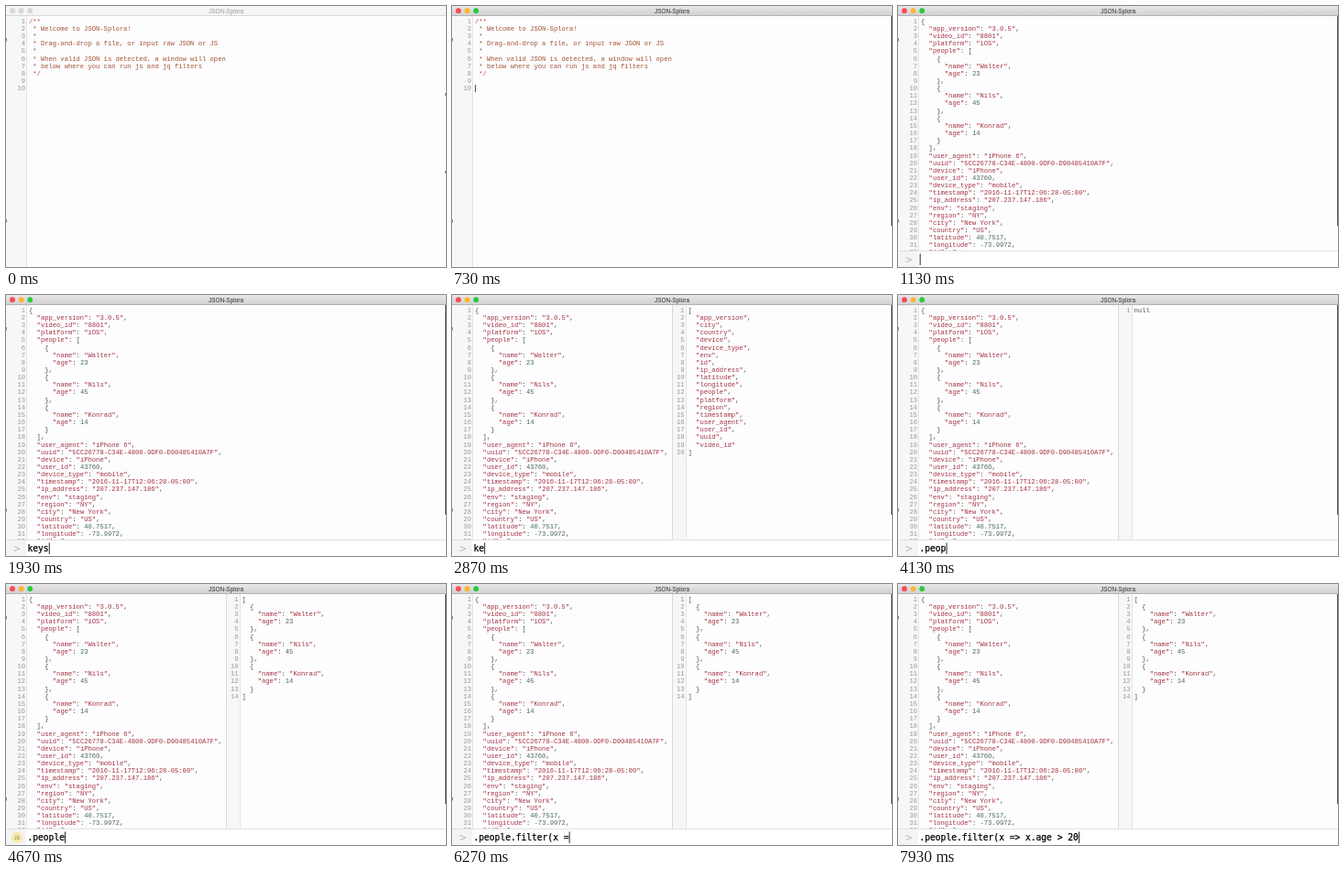
An HTML page with a canvas for the animation above (8000 ms loop, 480 px wide and 285 px high).

```html
<!DOCTYPE html>
<html lang="en">
<head>
<meta charset="utf-8">
<title>JSON-Splora</title>
<style>
html, body { margin: 0; width: 100%; height: 100%; overflow: hidden; background: #fdfcfe; }
canvas { display: block; width: 480px; height: 285px; }
</style>
</head>
<body>
<canvas id="stage"></canvas>
<script>
const W = 480, H = 285, LOOP = 8000;
const CODE_FONT = '7.17px "Liberation Mono", monospace';
const INPUT_FONT = '9.6px "DejaVu Sans Mono", monospace';
const CHAR = 4.302, ROW = 8.15, FIRST_ROW = 18.8, BAR_Y = 267;
const PAPER = '#fdfcfe', RULE = '#dadada';
const ACTIVATE = 330, PASTE = 800, KEYS_OUT = 2070;

const canvas = document.getElementById('stage');
const ctx = canvas.getContext('2d');
const ratio = window.devicePixelRatio || 1;
canvas.width = W * ratio;
canvas.height = H * ratio;
ctx.scale(ratio, ratio);

const data = {
  app_version: '3.0.5',
  video_id: '8801',
  platform: 'iOS',
  people: [
    { name: 'Walter', age: 23 },
    { name: 'Nils', age: 45 },
    { name: 'Konrad', age: 14 }
  ],
  user_agent: 'iPhone 6',
  uuid: '5CC26778-C34E-4800-9DF0-D90485410A7F',
  device: 'iPhone',
  user_id: 43760,
  device_type: 'mobile',
  timestamp: '2016-11-17T12:06:28-05:00',
  ip_address: '207.237.147.186',
  env: 'staging',
  region: 'NY',
  city: 'New York',
  country: 'US',
  latitude: 40.7517,
  longitude: -73.9972,
  id: 8
};

const toLines = value => JSON.stringify(value, null, 2).split('\n');
const source = toLines(data);
const keyList = toLines(Object.keys(data).sort());
const people = toLines(data.people);
const welcome = [
  '/**',
  ' * Welcome to JSON-Splora!',
  ' *',
  ' * Drag-and-drop a file, or input raw JSON or JS',
  ' *',
  ' * When valid JSON is detected, a window will open',
  ' * below where you can run js and jq filters',
  ' */',
  '',
  ''
];

// Each edit is [time, text in the filter input].
const edits = [[PASTE, '']];
function type(text, start, step) {
  let value = edits[edits.length - 1][1];
  [...text].forEach((c, i) => edits.push([start + i * step, value += c]));
}
function erase(start, step) {
  const value = edits[edits.length - 1][1];
  for (let n = value.length - 1, i = 0; n >= 0; n--, i++) {
    edits.push([start + i * step, value.slice(0, n)]);
  }
}
type('keys', 1500, 135);
erase(2740, 130);
type('.', 3320, 0);
type('people', 3600, 133);
type('.filter(x =', 4870, 138);
type('> x.age > 20', 6400, 138);

function rect(color, x, y, w, h) {
  ctx.fillStyle = color;
  ctx.fillRect(x, y, w, h);
}

function circle(color, x, y, r) {
  ctx.fillStyle = color;
  ctx.beginPath();
  ctx.arc(x, y, r, 0, Math.PI * 2);
  ctx.fill();
}

function label(text, x, y, font, color, align = 'left') {
  ctx.font = font;
  ctx.fillStyle = color;
  ctx.textAlign = align;
  ctx.fillText(text, x, y);
}

function codeLine(line, x, y) {
  for (const m of line.matchAll(/"[^"]*"|-?\d[\d.]*|[^\s"\d-]+/g)) {
    const color = m[0][0] === '"' ? '#a23440' : /\d/.test(m[0]) ? '#47695c' : '#505050';
    label(m[0], x + m.index * CHAR, y, CODE_FONT, color);
  }
}

function pane(lines, left, gutterEnd, numberX, textX, comment) {
  rect(PAPER, left, 11, W - left, H - 11);
  rect('#f7f7f7', left, 11, gutterEnd - left, H - 11);
  rect(RULE, gutterEnd, 11, 0.7, H - 11);
  lines.forEach((line, i) => {
    const y = FIRST_ROW + i * ROW;
    label(i + 1, numberX, y, CODE_FONT, '#999', 'right');
    if (comment) label(line, textX, y, CODE_FONT, '#a4522f');
    else codeLine(line, textX, y);
  });
}

function titleBar(active) {
  const fill = ctx.createLinearGradient(0, 0, 0, 10);
  fill.addColorStop(0, active ? '#e8e6e8' : '#f6f6f6');
  fill.addColorStop(1, active ? '#d3d1d3' : '#f4f4f4');
  rect(fill, 0, 0, W, 10);
  rect(active ? '#b4b2b4' : '#d8d8d8', 0, 10, W, 1);
  const lights = active ? ['#fb4a50', '#fdb52e', '#27cb3e'] : ['#d6d6d6', '#d6d6d6', '#d6d6d6'];
  lights.forEach((c, i) => circle(c, 7 + i * 9.6, 5.2, 2.9));
  label('JSON-Splora', 240, 7.7, '6.45px "Liberation Sans", sans-serif',
    active ? '#303030' : '#999', 'center');
}

function outputAt(t, text) {
  if (t < KEYS_OUT) return null;
  if (t < 3320) return keyList;
  if (text === '.') return source;
  return text.length < 7 ? ['null'] : people;
}

function modeOf(text, t) {
  if (text === '.' || (text === 'keys' && t >= KEYS_OUT)) return 'jq';
  return text === '.people' ? 'js' : '>';
}

function promptIcon(mode) {
  if (mode === 'jq') {
    label('jq', 11.7, 279, '7.2px "Liberation Mono", monospace', '#666', 'center');
  } else if (mode === 'js') {
    circle('#f4eaac', 12, 276.8, 6);
    label('JS', 12, 278.6, '5px "Liberation Sans", sans-serif', '#77704a', 'center');
  } else {
    label('>', 12, 281, '13px "DejaVu Sans Mono", monospace', '#bbb', 'center');
  }
}

function filterBar(t, edited, text) {
  rect('#fff', 0, BAR_Y, W, H - BAR_Y);
  rect('#f4f4f4', 0, BAR_Y, 22, H - BAR_Y);
  rect(RULE, 0, BAR_Y, W, 0.8);
  promptIcon(modeOf(text, t));
  label(text, 23.5, 280.1, INPUT_FONT, '#000');
  // A hairline outline gives the input its heavier weight
  ctx.strokeStyle = '#000';
  ctx.lineWidth = 0.25;
  ctx.strokeText(text, 23.5, 280.1);
  if ((t - edited) % 1060 < 530) {
    rect('#111', 23.7 + ctx.measureText(text).width, 270.5, 0.9, 12.5);
  }
}

// Slivers of the desktop behind the window
function desktopEdges(active) {
  if (active) rect('#555', 479, 11, 1, 229);
  else [95, 180].forEach(y => rect('#777', 479, y, 1, 3));
  [35, 233].forEach(y => rect('#555', 0, y, 0.7, 3.5));
}

function draw(t) {
  const active = t >= ACTIVATE;
  if (t < PASTE) {
    pane(welcome, 0, 22, 21, 25, true);
    if (active && (t - ACTIVATE) % 1060 < 530) rect('#222', 25, 86, 0.8, 8);
  } else {
    const [edited, text] = edits.filter(e => e[0] <= t).pop();
    const output = outputAt(t, text);
    pane(source, 0, 22, 21, 25);
    if (output) {
      pane(output, 240, 255, 253.5, 257.5);
      rect(RULE, 240, 11, 1, H - 11);
    }
    filterBar(t, edited, text);
  }
  titleBar(active);
  desktopEdges(active);
}

function frame() {
  draw(performance.now() % LOOP);
  requestAnimationFrame(frame);
}
frame();
</script>
</body>
</html>
```
